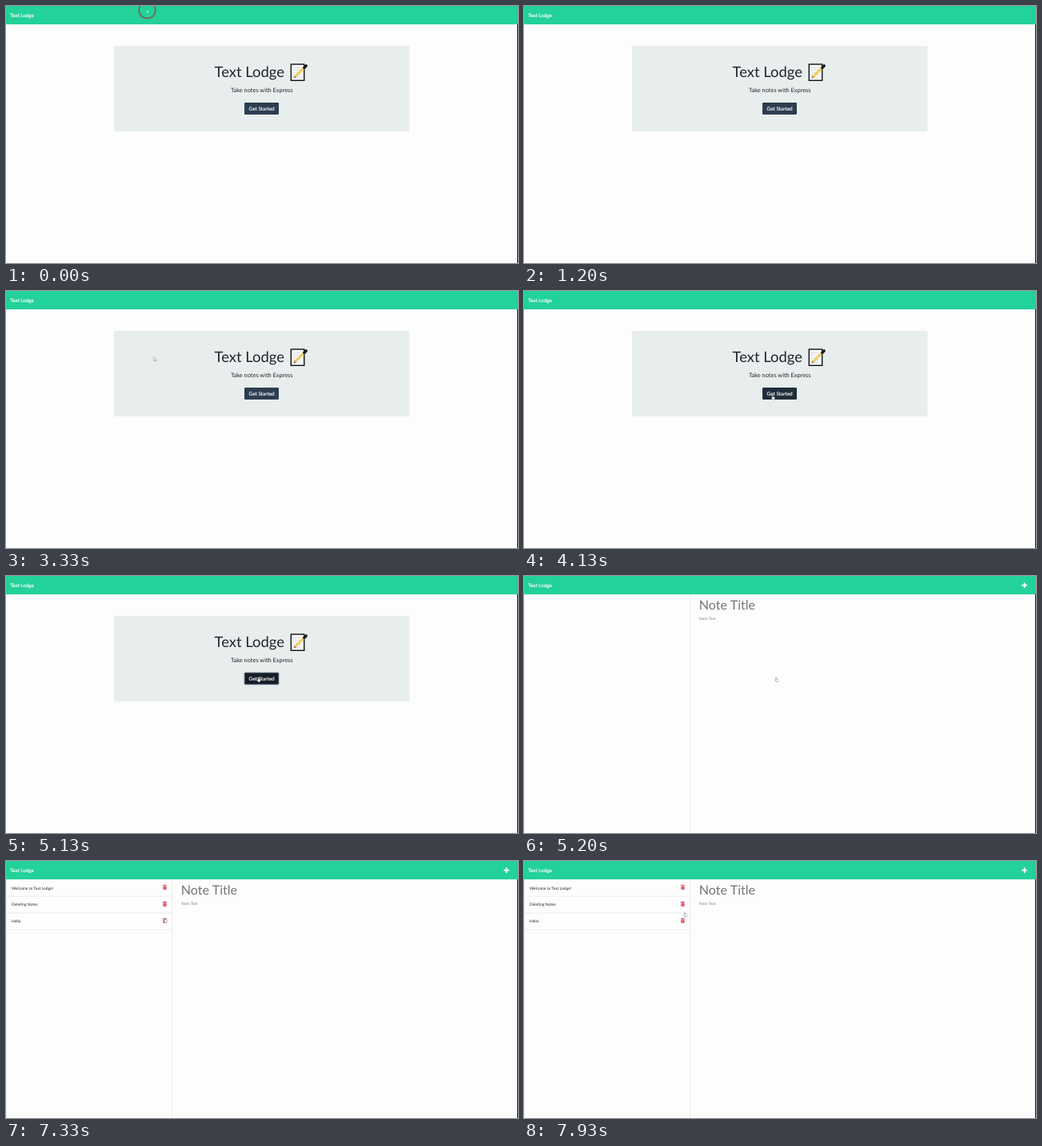
These frames come from a looping animation (640x322 px, 8000 ms). An HTML page:

```html
<!DOCTYPE html>
<html lang="en">
<head>
<meta charset="utf-8">
<title>Text Lodge</title>
<style>
  html, body { margin: 0; width: 100%; height: 100%; overflow: hidden; background: #fdfdfd; }
  svg { display: block; width: 640px; height: 322px; }
  text { font-family: Lato, "Open Sans", sans-serif; text-rendering: geometricPrecision; white-space: pre; fill: #212529; }
  .light { fill: #fff; stroke: #fff; stroke-width: .15; }
  .item { font-size: 4.95px; }
  .mid { text-anchor: middle; }
  .rule { stroke: #e6e8e8; stroke-width: .8; fill: none; }
  .pointer { fill: #fff; stroke: #777; stroke-width: .5; }
  #button { fill: #2c3e50; }
  #button.hover { fill: #202d3b; }
  #button.active { fill: #151e27; stroke: #8794a1; stroke-width: .9; }
</style>
</head>
<body>
<svg viewBox="0 0 640 322">
  <defs>
    <g id="trash" fill="#dc6670">
      <rect y=".5" width="5.3" height="1"/>
      <rect x="1.6" width="2.1" height="1"/>
      <rect x=".4" y="1.8" width="4.5" height="4.6" rx=".7"/>
    </g>
  </defs>

  <rect width="640" height="322" fill="#fdfdfd"/>
  <rect x="639" y="23" width="1" height="299" fill="#111"/>
  <rect width="640" height="23" fill="#23d19a"/>
  <text class="light" x="5.3" y="13.9" font-size="6.2">Text Lodge</text>

  <g id="home">
    <rect x="135" y="50" width="369.3" height="107.2" rx="1.2" fill="#e8eeed"/>
    <text x="260.6" y="89.2" font-size="18.4">Text Lodge</text>
    <g id="memo">
      <rect x="356.3" y="73" width="16.4" height="20.3" fill="#f7f8f8" stroke="#111" stroke-width="1.4"/>
      <path d="M359 77.5h9m-9 3h9m-9 3h9m-9 3h9m-9 3h9" stroke="#d0d4d5" stroke-width=".7"/>
      <path d="M361.5 88.5L373.5 76.5" stroke="#f0cd55" stroke-width="3"/>
      <path d="M359.8 90.2l.8-2.6 1.8 1.8z" fill="#6b5b3c"/>
      <path d="M372.8 77.2l2.3-2.3" stroke="#1c1f21" stroke-width="3.6" stroke-linecap="round"/>
    </g>
    <text class="mid" x="319.8" y="108.4" font-size="7.4">Take notes with Express</text>
    <rect id="button" x="298" y="121" width="43" height="15" rx="1.3"/>
    <text class="mid light" x="319.6" y="130.7" font-size="6.35">Get Started</text>
  </g>

  <g id="notes">
    <path class="rule" d="M.4 23V322M207.8 23V322"/>
    <g id="list"></g>
    <text x="218.8" y="42" font-size="16.1" style="fill:#707579">Note Title</text>
    <text x="218.9" y="54.8" font-size="4.86" style="fill:#7b8084">Note Text</text>
    <path d="M625.6 8.2v6.8M622.2 11.6h6.8" stroke="#fff" stroke-width="1.8"/>
  </g>

  <g id="cursor">
    <g id="click">
      <circle cx="-.3" cy="-1.4" r="10.3" fill="none" stroke="#80584f" stroke-width="1.5"/>
      <circle cx=".2" cy=".6" r=".9" fill="#fff"/>
    </g>
    <path id="arrow" class="pointer" d="M0 0v4.7l1.1-1 .8 1.8 .9-.4-.8-1.7h1.5z"/>
    <path id="hand" class="pointer" d="M1.2.4q.6-.5.9.1v2l1.8.5q.7.2.6.9l-.3 1.3-.5 1H1.6L.3 4.2q-.1-.7.5-.5l.4.3z"/>
  </g>
</svg>
<script>
const LOOP = 8000, STEP = 1000 / 15;
const LEAVE = 60, PRESS = 5000, OPEN = 5200, LOADED = 5600;
const $ = id => document.getElementById(id);
const show = (id, on) => $(id).setAttribute("display", on ? "inline" : "none");

// Each glide: start, end, and the place where the pointer comes to rest.
const glides = [
  [LEAVE, 330, 177, -18],
  [1930, 2200, 62, 50],
  [2460, 2600, 75, 41],
  [2600, 4130, 309, 130],
  [4200, 5130, 313.5, 126.5],
  [LOADED, LOADED, 112, 128],
  [6060, 6530, 95, 37],
  [6530, 6860, 196.5, 72],
  [7130, 7930, 199.5, 64.3]
];
const ease = k => k * k * (3 - 2 * k);

function pointer(t) {
  let x = 176.8, y = 6.6;
  for (const [from, to, endX, endY] of glides) {
    if (t < from - 5) break;
    const k = ease(Math.max(0, Math.min(1, (t - from) / (to - from || 1))));
    const done = from === to ? 1 : k;
    x += (endX - x) * done;
    y += (endY - y) * done;
  }
  return [x, y];
}

$("list").innerHTML = ["Welcome to Text Lodge!", "Deleting Notes", "Hello"].map((name, i) =>
  `<g transform="translate(0 ${i * 20.9})">
    <text class="item" x="7" y="35.5">${name}</text>
    <use href="#trash" x="195.8" y="29.6"/>
    <path class="rule" d="M0 44.2H207.8"/>
  </g>`).join("");

function draw(time) {
  const t = Math.floor((time % LOOP + 6) / STEP) * STEP % LOOP;
  const [x, y] = pointer(t);
  const home = t < OPEN - 1;
  const over = home && x > 298 && y > 121 && y < 136;
  const click = t < 1000;

  show("home", home);
  show("notes", !home);
  show("list", t >= LOADED - 1);
  $("button").setAttribute("class", over ? (t >= PRESS - 1 ? "active" : "hover") : "");

  $("cursor").setAttribute("transform", `translate(${x} ${y})`);
  show("click", click);
  show("arrow", !click && home && !over);
  show("hand", over || !home);
}

const begin = performance.now();
function tick() {
  draw(performance.now() - begin);
  requestAnimationFrame(tick);
}
tick();
</script>
</body>
</html>
```
